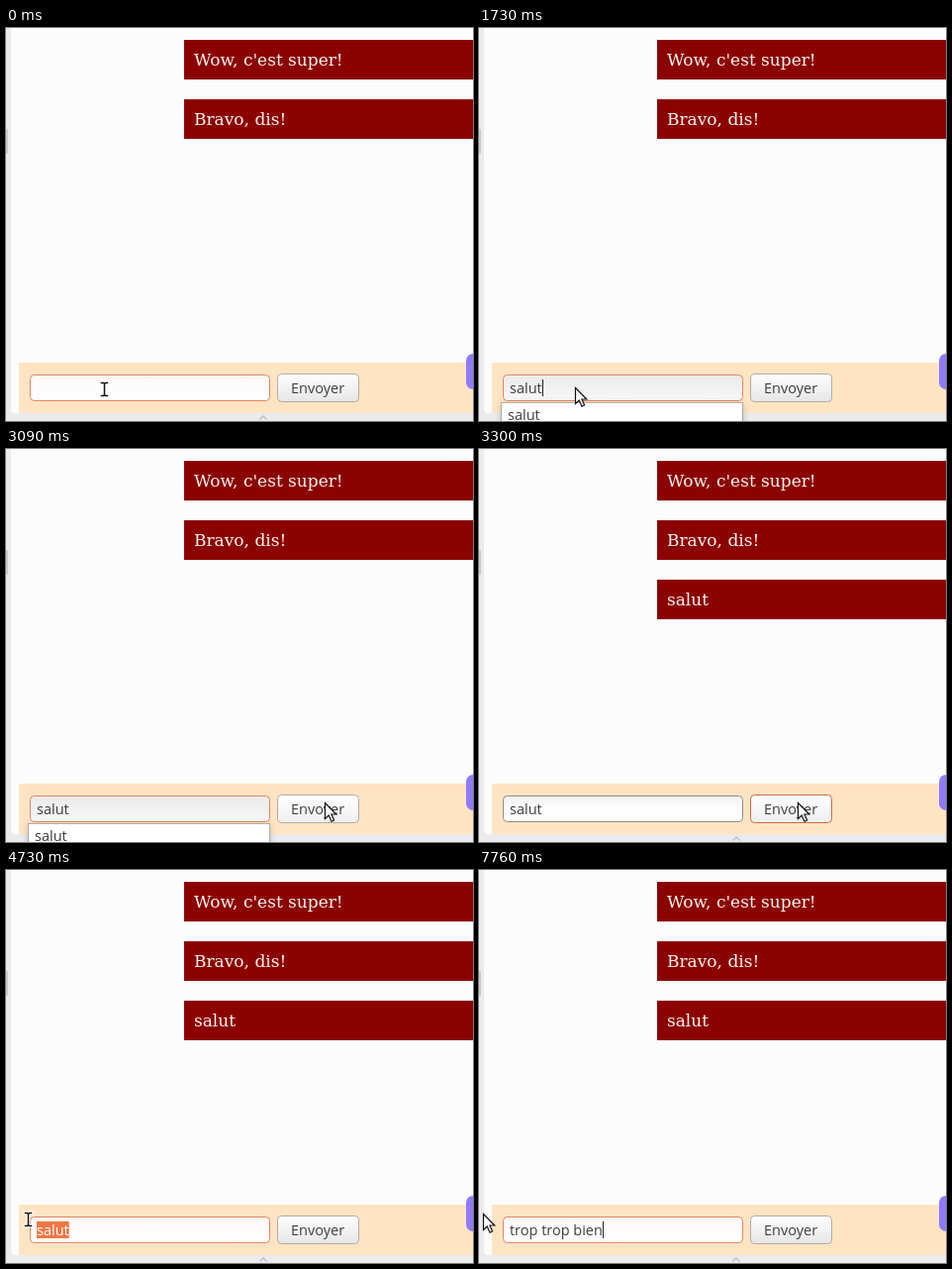
These frames come from a looping animation (472 by 397 pixels, 8000 ms). An HTML page:

```html
<!DOCTYPE html>
<html lang="fr">
<head>
<meta charset="utf-8">
<title>Messages</title>
<style>
  html, body { margin: 0; width: 100%; height: 100%; overflow: hidden; background: #fcfcfc; }
  svg { display: block; width: 472px; height: 397px; }
  text { white-space: pre; }
  .ui { font: 14.5px "Open Sans", sans-serif; fill: #3d3d3d; }
  .msg rect { fill: #8b0300; }
  .msg text { font: 17px "DejaVu Serif", serif; fill: #fcf6f4; }
  #menu rect { filter: drop-shadow(0 2px 3px rgba(0, 0, 0, .2)); }
</style>
</head>
<body>
<svg viewBox="0 0 472 397">
  <defs>
    <linearGradient id="plain" x2="0" y2="1">
      <stop stop-color="#f0f0f0"/><stop offset=".35" stop-color="#fcfcfc"/><stop offset="1" stop-color="#fff"/>
    </linearGradient>
    <linearGradient id="focus" x2="0" y2="1">
      <stop stop-color="#fbf1ed"/><stop offset=".25" stop-color="#fdfbfa"/><stop offset="1" stop-color="#fff"/>
    </linearGradient>
    <linearGradient id="filled" x2="0" y2="1">
      <stop stop-color="#ebebeb"/><stop offset="1" stop-color="#f7f7f7"/>
    </linearGradient>
    <linearGradient id="raised" x2="0" y2="1">
      <stop stop-color="#fefefe"/><stop offset="1" stop-color="#e7e6e6"/>
    </linearGradient>
    <linearGradient id="lit" x2="0" y2="1">
      <stop stop-color="#fff"/><stop offset="1" stop-color="#f0efef"/>
    </linearGradient>
    <clipPath id="selClip"><rect id="selArea" y="355" height="17"/></clipPath>
  </defs>

  <rect width="472" height="397" fill="#ebebed"/>
  <rect x="5" y="-10" width="490" height="399" rx="4" fill="#fcfcfc"/>
  <rect x="-2" y="102" width="4" height="25" rx="1" fill="#cbcbcb"/>
  <path d="M256.500 395.500L260 392L263.500 395.500" fill="none" stroke="#bcbcc2" stroke-width="1.300"/>

  <g class="msg"><rect x="180" y="12" width="292" height="40"/><text x="190" y="38">Wow, c'est super!</text></g>
  <g class="msg"><rect x="180" y="72" width="292" height="40"/><text x="190" y="98">Bravo, dis!</text></g>
  <g class="msg" id="sent"><rect x="180" y="132" width="292" height="40"/><text x="190" y="158">salut</text></g>

  <rect x="13" y="338" width="459" height="51" fill="#ffe4c4"/>
  <rect x="465" y="329" width="30" height="36" rx="7" fill="#8f7bfa"/>

  <rect id="field" x="24.500" y="350.500" width="242" height="26" rx="4"/>
  <text id="typed" class="ui" x="31" y="369" xml:space="preserve"></text>
  <g id="sel" clip-path="url(#selClip)">
    <rect x="31" y="355" width="60" height="17" fill="#f07746"/>
    <text class="ui" x="31" y="369" style="fill:#fff">salut</text>
  </g>
  <rect id="caret" y="355" width="1" height="17" fill="#222"/>

  <rect id="button" x="274.500" y="349.500" width="82" height="28" rx="4"/>
  <text class="ui" x="288" y="369">Envoyer</text>

  <g id="menu">
    <rect x="22.500" y="378.500" width="244" height="30" fill="#fff" stroke="#b3aca5"/>
    <text class="ui" x="29" y="396">salut</text>
  </g>

  <path id="arrow" d="M.5 .5V16.500L4.200 13L7 19.200L9.600 18L6.900 12H11.800Z" fill="#fff" stroke="#111" stroke-width="1.200"/>
  <g id="beam" fill="none" stroke-linecap="square">
    <path id="beamPath" d="M-3 -6.500H-1L0 -5.500L1 -6.500H3M0 -5.500V5.500M-3 6.500H-1L0 5.500L1 6.500H3" stroke="#fff" stroke-width="3.400"/>
    <use href="#beamPath"/>
    <path d="M-3 -6.500H-1L0 -5.500L1 -6.500H3M0 -5.500V5.500M-3 6.500H-1L0 5.500L1 6.500H3" stroke="#111" stroke-width="1.500"/>
  </g>
</svg>
<script>
const LOOP = 8000;
const $ = id => document.getElementById(id);
const set = (id, attrs) => { for (const k in attrs) $(id).setAttribute(k, attrs[k]); };
const show = (id, on) => set(id, { visibility: on ? 'visible' : 'hidden' });

// [time, value] steps
const TEXT = [
  [0, ''], [1210, 's'], [1300, 'sa'], [1480, 'sal'], [1670, 'salu'], [1730, 'salut'],
  [5480, ''], [6000, 't'], [6210, 'tr'], [6420, 'tro'], [6510, 'trop'], [6700, 'trop '],
  [6850, 'trop t'], [7090, 'trop tr'], [7200, 'trop tro'], [7300, 'trop trop'],
  [7420, 'trop trop b'], [7550, 'trop trop bi'], [7700, 'trop trop bie'], [7760, 'trop trop bien']
];
const CARET = [[0, false], [550, true], [2480, false], [5700, true]];
const MENU = [[0, false], [1250, true], [3180, false]];
const FOCUS = [[0, 'field'], [3270, 'button'], [4400, 'field']];

// pointer tip: [time, x, y]
const PATH = [
  [0, 97, 363], [2440, 97, 363], [3090, 322, 357], [3400, 322, 357], [4060, 83, 380],
  [4110, 83, 380], [4380, 66, 362], [4430, 66, 362], [4880, 4, 347], [LOOP, 4, 347]
];

const at = (steps, t) => steps.filter(s => s[0] <= t).pop()[1];
const ease = k => k * k * (3 - 2 * k);

function pointer(t) {
  const i = PATH.findIndex(p => p[0] > t);
  const [t0, x0, y0] = PATH[i - 1], [t1, x1, y1] = PATH[i];
  const k = ease((t - t0) / (t1 - t0));
  return [x0 + (x1 - x0) * k, y0 + (y1 - y0) * k];
}

const inside = (x, y, l, top, r, b) => x >= l && x < r && y >= top && y < b;

function drawSelection(t, x) {
  const on = t >= 4430 && t < 5480;
  show('sel', on);
  if (!on) return;
  const edges = [0, 1, 2, 3, 4, 5].map(n => 31 + (n ? $('typed').getSubStringLength(0, n) : 0));
  const start = edges.reduce((a, b) => Math.abs(b - x) < Math.abs(a - x) ? b : a);
  set('selArea', { x: start, width: edges[5] - start });
}

function render(t) {
  const [x, y] = pointer(t);
  const menu = at(MENU, t), focus = at(FOCUS, t), text = at(TEXT, t);

  if ($('typed').textContent !== text) $('typed').textContent = text;
  show('caret', at(CARET, t));
  set('caret', { x: Math.ceil(31 + (text ? $('typed').getComputedTextLength() : 0)) });
  drawSelection(t, x);

  const active = focus === 'field';
  set('field', {
    fill: `url(#${menu ? 'filled' : active ? 'focus' : 'plain'})`,
    stroke: active ? '#df8763' : '#8f8a86'
  });

  const hover = inside(x, y, 274, 349, 357, 378);
  set('button', {
    fill: `url(#${hover ? 'lit' : 'raised'})`,
    stroke: focus === 'button' ? (hover ? '#cb6b41' : '#d79a7e') : '#b3aaa2'
  });

  show('menu', menu);
  show('sent', t >= 3300);

  const dragging = t >= 4430 && t < 5520;
  const beam = dragging || !menu && inside(x, y, 24, 350, 267, 377);
  show('beam', beam);
  show('arrow', !beam);
  set('beam', { transform: `translate(${Math.round(x) + 2.5} ${Math.round(y) + 2})` });
  set('arrow', { transform: `translate(${Math.round(x)} ${Math.round(y)})` });
}

const begin = performance.now();
function tick() {
  render((performance.now() - begin) % LOOP);
  requestAnimationFrame(tick);
}
tick();
</script>
</body>
</html>
```
